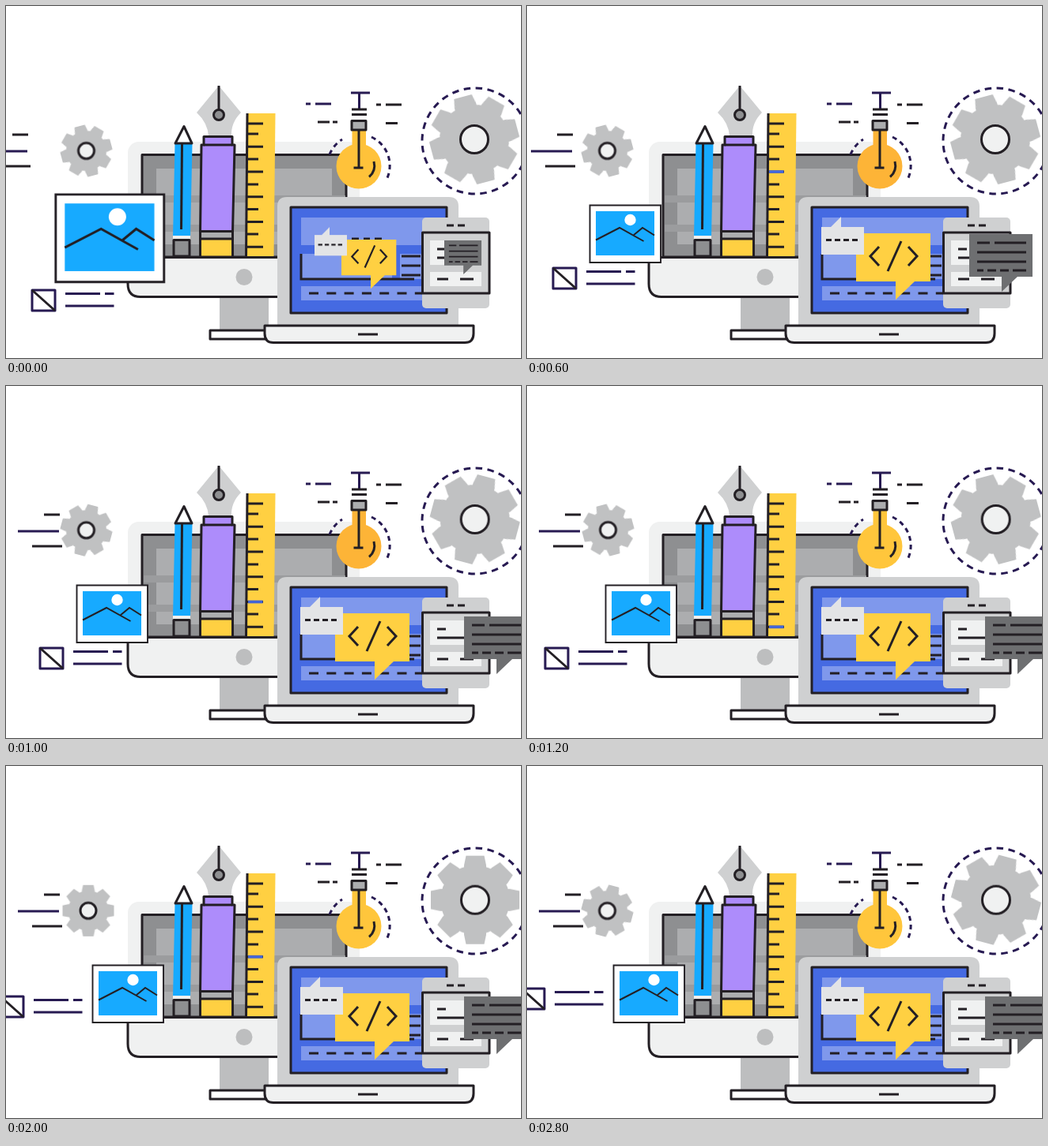
An HTML page without scripts for the animation above (3 s loop, 651 by 446 pixels).

```html
<!DOCTYPE html>
<html lang="en">
<head>
<meta charset="utf-8">
<title>Design and development desk</title>
<style>
html, body { margin: 0; width: 100%; height: 100%; overflow: hidden; background: #fff; }
svg { display: block; width: 651px; height: 446px; }

.ln { fill: none; stroke: #231f24; stroke-width: 3; }
.ol { stroke: #231f24; stroke-width: 3; stroke-linejoin: round; }
.violet { stroke: #271a52; }
.pale { fill: #f0f1f1; }
.silver { fill: #cfd0d1; }
.mid { fill: #bdbebf; }
.steel { fill: #8e8f91; }
.panel { fill: #acadaf; }
.sky { fill: #17aaff; }
.yellow { fill: #ffd042; }
.purple { fill: #ad8cfb; }
.blue { fill: #456ae2; }
.soft { fill: #7f98ec; }
.white { fill: #fff; }

/* the picture advances every 200 ms, 15 poses per loop */
.a { animation: 3s step-end infinite; }
.spin { animation: spin .6s steps(3) infinite; }
.speed { animation-name: speed; }
.icon { animation-name: icon; }
.photo { animation-name: photo; }
.note { animation-name: note; }
.code { animation-name: code; }
.chat { animation-name: chat; }
.bulb { animation-name: bulb; }
.wob { animation-name: wob; }
.wob2 { animation-name: wob2; }
.show { animation-name: show; }
.tick { animation: tick 1.2s steps(6) -1s infinite; }

@keyframes spin { from { transform: rotate(-15deg); } to { transform: rotate(30deg); } }
@keyframes tick { from { transform: translateY(146.5px); } to { transform: translateY(337px); } }
@keyframes show { 0%, 86.667%, 100% { opacity: 0; } 6.667% { opacity: 1; } }
@keyframes speed {
  0% { transform: translateX(-40px); animation-timing-function: steps(4); }
  26.667%, 100% { transform: none; }
}
@keyframes icon {
  0% { transform: translate(32px, 359px); }
  6.667% { transform: translate(32px, 351px); }
  13.333% { transform: translate(32px, 341px); }
  20% { transform: translate(32px, 331px); }
  26.667% { transform: translate(42px, 331px); }
  40% { transform: translate(22px, 331px); }
  46.667% { transform: translate(12px, 331px); }
  53.333% { transform: translate(-8px, 331px); }
  60% { transform: translate(-8px, 311px); }
  66.667% { transform: translate(-8px, 291px); }
  73.333%, 100% { transform: translate(-8px, 281px); }
}
@keyframes photo {
  0% { transform: translate(62px, 238px) scale(1.53); animation-timing-function: steps(3); }
  20% { transform: translate(79px, 252px) scale(1); }
  26.667% { transform: translate(89px, 252px) scale(1); }
  40% { transform: translate(99px, 252px) scale(1); }
  53.333%, 100% { transform: translate(109px, 252px) scale(1); }
}
@keyframes note {
  0% { transform: translate(390px, 290px) scale(.76); animation-timing-function: steps(3); }
  20%, 100% { transform: translate(372px, 280px) scale(1); }
}
@keyframes code {
  0% { transform: translate(424px, 296px) scale(.74); animation-timing-function: steps(3); }
  20%, 100% { transform: translate(416px, 288px) scale(1); }
}
@keyframes chat {
  0% { transform: translate(554px, 297px) scale(.59); animation-timing-function: steps(3); }
  20% { transform: translate(559px, 289px) scale(1); }
  26.667% { transform: translate(569px, 291px) scale(1); }
  33.333%, 100% { transform: translate(579px, 292px) scale(1); }
}
@keyframes bulb {
  0% { fill: #ffc23a; }
  13.333% { fill: #fdb437; }
  40% { fill: #ffc63c; }
  73.333% { fill: #ecb23b; }
  80% { fill: #dba23a; }
  86.667% { fill: #ecb23b; }
  93.333%, 100% { fill: #ffc63c; }
}
@keyframes wob {
  0% { transform: translate(101.5px, 183.5px); }
  26.667% { transform: translate(101.5px, 182.7px); }
  40% { transform: translate(102.5px, 182.5px); }
  53.333% { transform: translate(103.5px, 182.5px); }
  66.667% { transform: translate(104px, 183.3px); }
  80% { transform: translate(103px, 183.5px); }
  93.333%, 100% { transform: translate(101.5px, 183.5px); }
}
@keyframes wob2 {
  0% { transform: translate(592px, 169px); }
  33.333% { transform: translate(592.7px, 169px); }
  66.667%, 100% { transform: translate(593px, 169.7px); }
}
</style>
</head>
<body>
<svg viewBox="0 0 651 446">
  <defs>
    <path id="bar" d="M-14 -44 L-11.5 -56 H11.5 L14 -44 V44 L11.5 56 H-11.5 L-14 44 Z"/>
    <g id="gear" fill="#c0c1c2">
      <circle r="44"/>
      <use href="#bar"/>
      <use href="#bar" transform="rotate(45)"/>
      <use href="#bar" transform="rotate(90)"/>
      <use href="#bar" transform="rotate(135)"/>
    </g>
  </defs>

  <!-- gears -->
  <circle class="ln violet" cx="593" cy="171" r="67" stroke-dasharray="8.5 6.54"/>
  <g class="a wob2">
    <use class="spin" href="#gear"/>
    <circle class="ol pale" r="17.5" stroke-width="3.5"/>
  </g>
  <g class="a speed">
    <path class="ln" d="M48 163H68M33 203H71"/>
    <path class="ln violet" d="M15 184H67"/>
  </g>
  <g class="a wob">
    <g transform="scale(.58)"><use class="spin" href="#gear"/></g>
    <circle class="ol pale" r="10"/>
  </g>

  <!-- monitor -->
  <path class="mid" d="M270 369H332V411H270Z"/>
  <path class="ol white" d="M258 411H340V422H258Z"/>
  <rect class="pale" x="154" y="172" width="293" height="190" rx="14"/>
  <path class="ol steel" d="M172 188.5H430V318H172Z"/>
  <path fill="#9b9c9e" d="M174 240H429V249H174ZM174 277H429V286H174Z"/>
  <path class="panel" d="M190 206H412V240H190ZM190 249H412V277H190ZM190 286H412V302H190Z"/>
  <path class="ol pale" d="M154 318.5H360V368.5H170Q154 368.5 154 352Z"/>
  <circle class="mid" cx="301" cy="343.5" r="10.5"/>

  <!-- pencil -->
  <path class="sky" d="M213.5 174H235.5L233 293H211Z"/>
  <path class="ol white" stroke-width="2.5" d="M225 152.5L235 174H214Z"/>
  <path class="ln" d="M222.500 175L221.500 283"/>
  <path class="pale" d="M211 291H233V296H211Z"/>
  <path class="ol steel" stroke-width="2.5" d="M212 296.500H232V317H212Z"/>

  <!-- fountain pen -->
  <path class="silver" d="M269 101L297 135Q284 148 285 165H256Q255 148 241 135Z"/>
  <path class="ln" d="M269 101V132"/>
  <circle class="ol steel" cx="269" cy="138" r="6.500"/>
  <path class="ol purple" d="M250 165.500H286V176H289L286.500 286H245.500L247 176H250Z"/>
  <path class="ln" d="M250 176H286"/>
  <path class="ol yellow" d="M245.500 294H286.500V318H245.500Z"/>
  <path class="ol panel" d="M245.500 285.500H286.500V295H245.500Z"/>

  <!-- ruler -->
  <path class="yellow" d="M305 136H340.500L338.500 318H303Z"/>
  <path class="ln" d="M305 136L303.500 318"/>
  <path class="ln" d="M305 149H325M305 178.200H325M305 210H325M305 241.800H325M305 273.500H325M305 305.300H325"/>
  <path class="ln" d="M305 162H319M305 194H319M305 226H319M305 257.500H319M305 289H319"/>
  <g class="a show"><path class="tick" d="M306 0H324.500" stroke="#456ae2" stroke-width="3.500"/></g>
  <path class="ln" d="M154 318.500H345"/>

  <!-- light bulb -->
  <path class="ln violet" stroke-dasharray="6 5" d="M409 188A40 40 0 0 1 425 169M462 166A40 40 0 0 1 481 220"/>
  <g class="a bulb">
    <path d="M437.500 157H455V180H437.500Z"/>
    <circle cx="446" cy="203" r="28.500"/>
  </g>
  <path class="ln" d="M446 157V205M439.500 205H451.500M465 197Q468 209 459 216.500"/>
  <path class="ol panel" d="M437 145.500H455V157H437Z"/>
  <path class="ln violet" d="M436 110H460M446.500 110V131M379 124H385M391 124H411"/>
  <path class="ln" d="M437 131H456M437 137.500H456M468 125H474M480 125H500M394 147H409M413 147H419M480 148.500H495"/>

  <!-- laptop -->
  <path class="silver" d="M343 405V254Q343 242 355 242H560Q572 242 572 254V405Z"/>
  <path class="ol blue" d="M360 255H557V389H360Z"/>
  <path class="soft" d="M373 268H545V303H373ZM373 314H488V346H373ZM498 314H545V346H498ZM373 355H545V373H373Z"/>
  <path class="ln" d="M373 314V346H516M500 317H524M500 329H524M500 341H524M437 295H446M452 295H460M466 295H475"/>
  <path class="ln" d="M383 364H535" stroke-dasharray="12 10.300"/>
  <path class="ol pale" d="M327 405H591V415Q591 426.500 580 426.500H338Q327 426.500 327 415Z"/>
  <path class="ln" d="M445 416H470"/>

  <!-- phone -->
  <rect class="silver" x="526" y="268" width="85" height="115" rx="5"/>
  <path class="ol silver" d="M526.500 287H611V364H526.500Z"/>
  <path class="pale" d="M536 297H601V328H536ZM536 337H601V355H536Z"/>
  <path class="ln" d="M557 278H566M571 278H580M545 308H556M545 319H580M545 346H559M574 346H591"/>

  <!-- speech bubbles -->
  <g class="a code">
    <path class="yellow" d="M0 0H94V61H74L50 84V61H0Z"/>
    <path class="ln" stroke-width="3.500" d="M29 17L18 29L29 41M57 10L40 48M66 17L77 29L66 41"/>
  </g>
  <g class="a note">
    <path fill="#e3e4e6" d="M0 0H12L25 -13V0H54V35H0Z"/>
    <path class="ln" d="M6 16.500H13M17 16.500H24M28 16.500H35M39 16.500H46"/>
  </g>
  <g class="a chat">
    <path fill="#6e6f71" d="M0 0H80V54H61L41 73V54H0Z"/>
    <path class="ln" d="M10 11H26M32 11H72M10 23H72M10 35H72M10 46H18M23 46H34M39 46H50M55 46H72"/>
  </g>

  <!-- crossed box with caption lines -->
  <g class="a icon">
    <path class="ol violet" fill="#fff" d="M1 1H30V27H1Z"/>
    <path class="ln" d="M1 1L30 27"/>
    <path class="ln violet" d="M43 5.500H87M93 5.500H104.500M43 21H104.500"/>
  </g>

  <!-- picture card -->
  <g class="a photo">
    <path class="ol white" style="stroke-width:1.900;stroke-linejoin:miter" d="M.5 .5H90V73H.5Z"/>
    <path class="sky" d="M8 8H82V64H8Z"/>
    <circle class="white" cx="51.500" cy="19" r="7.200"/>
    <path class="ln" style="stroke-width:2" d="M8 44.500L38 29L68.500 46M55.500 38.500L67 29L82 38.500"/>
  </g>
</svg>
</body>
</html>
```
